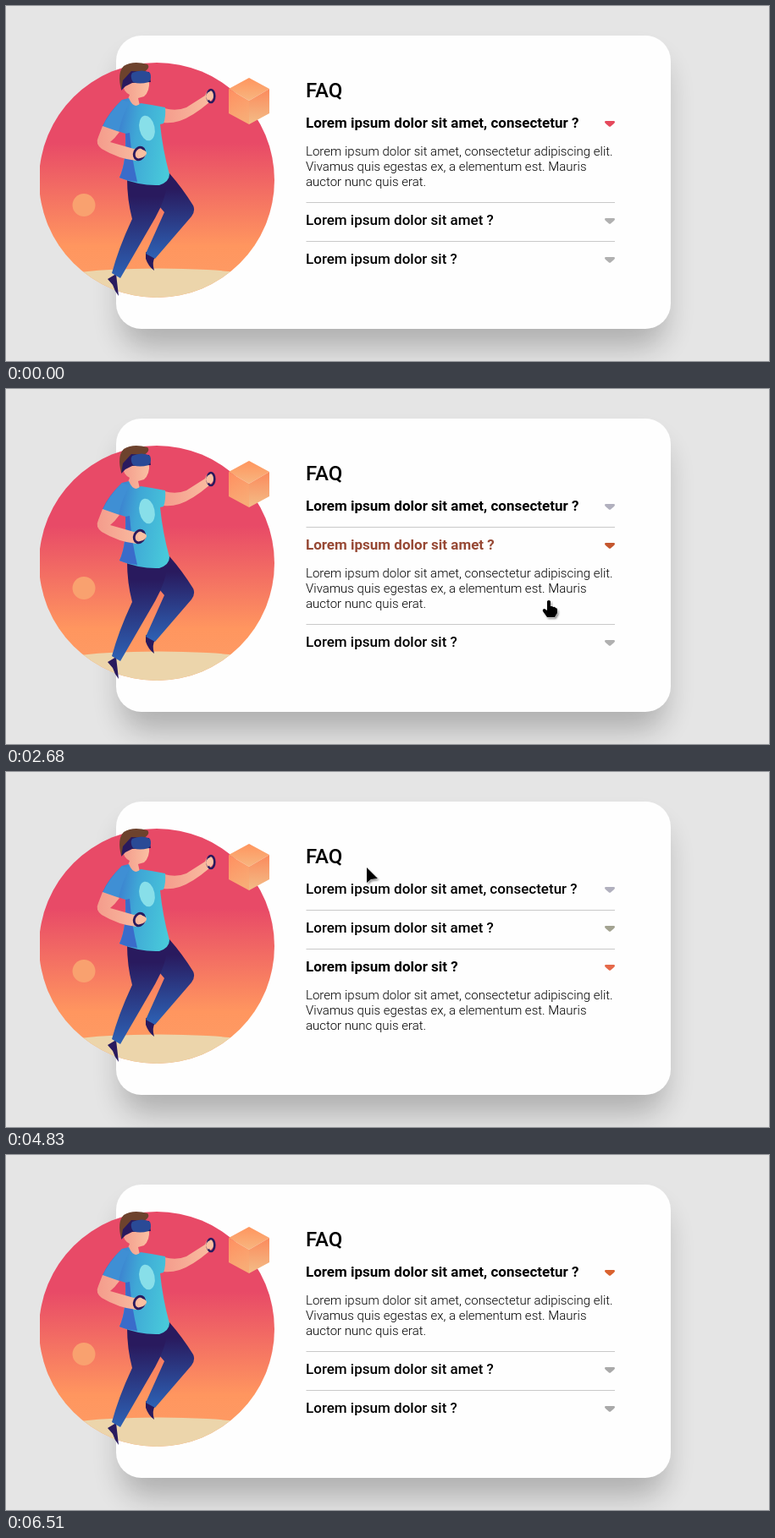
An HTML page for the animation above (6840 ms loop, 901 by 420 pixels).

```html
<!DOCTYPE html>
<html lang="en">
<head>
<meta charset="utf-8">
<title>FAQ</title>
<style>
html, body { margin: 0; width: 100%; height: 100%; overflow: hidden; background: #e5e5e5; }
svg { display: block; width: 901px; height: 420px; font-family: Roboto, sans-serif; }
.heading { font-size: 24px; font-weight: 500; }
.title { font-size: 17px; }
.body { font-size: 15px; font-weight: 300; }
</style>
</head>
<body>
<svg viewBox="0 0 901 420">
  <defs>
    <linearGradient id="sky" x1="0" y1="0" x2="0" y2="1">
      <stop offset=".34" stop-color="#e84a67"/><stop offset=".78" stop-color="#ff965f"/><stop offset="1" stop-color="#fd9d66"/>
    </linearGradient>
    <linearGradient id="shirt" x1="0" y1=".4" x2="1" y2=".6">
      <stop offset=".1" stop-color="#3b72cd"/><stop offset=".48" stop-color="#3fa7d6"/><stop offset="1" stop-color="#48c9da"/>
    </linearGradient>
    <linearGradient id="denim" x1="0" y1="0" x2="0" y2="1">
      <stop offset=".18" stop-color="#291a5e"/><stop offset="1" stop-color="#2d62b5"/>
    </linearGradient>
    <linearGradient id="skin" x1="0" y1="0" x2="1" y2="0">
      <stop offset="0" stop-color="#f49c8c"/><stop offset="1" stop-color="#fac0a2"/>
    </linearGradient>
    <linearGradient id="cubeTop" x1="0" y1="0" x2="0" y2="1">
      <stop offset="0" stop-color="#ff955e"/><stop offset="1" stop-color="#f7b680"/>
    </linearGradient>
    <linearGradient id="cubeLeft" x1="0" y1="0" x2=".3" y2="1">
      <stop offset="0" stop-color="#ff8f60"/><stop offset="1" stop-color="#f8ac76"/>
    </linearGradient>
    <linearGradient id="cubeRight" x1="0" y1="0" x2="0" y2="1">
      <stop offset="0" stop-color="#fb8a5c"/><stop offset="1" stop-color="#f3bd87"/>
    </linearGradient>
    <clipPath id="disc"><path d="M40 60H330V350H40Z"/></clipPath>
    <clipPath id="ground"><circle cx="178" cy="206" r="139"/></clipPath>
    <filter id="blur" x="-20%" y="-30%" width="140%" height="160%"><feGaussianBlur stdDeviation="17"/></filter>
    <filter id="soft" x="-50%" y="-50%" width="200%" height="200%"><feGaussianBlur stdDeviation="1.3"/></filter>
  </defs>

  <rect width="901" height="420" fill="#e5e5e5"/>
  <rect x="136" y="62" width="643" height="342" rx="30" opacity=".23" filter="url(#blur)"/>
  <rect x="130" y="35" width="655" height="347" rx="30" fill="#fefefe"/>

  <g clip-path="url(#disc)">
    <circle cx="178" cy="206" r="139" fill="url(#sky)"/>
    <ellipse cx="180" cy="331" rx="150" ry="20.500" fill="#ecd5ab" clip-path="url(#ground)"/>
  </g>
  <circle cx="92" cy="235.500" r="13.500" fill="#f9a16f"/>
  <path d="M287 85L311 98L287 112L263 98Z" fill="url(#cubeTop)"/>
  <path d="M263 98L287 112V140L263 127Z" fill="url(#cubeLeft)"/>
  <path d="M311 98L287 112V140L311 127Z" fill="url(#cubeRight)"/>

  <g id="person">
    <path d="M165 291L176 297Q172 303 175 313Q168 308 165 299Z" fill="#291a5e"/>
    <path d="M120 323L130 317L133 343Q128 337 126 330Z" fill="#291a5e"/>
    <path d="M160 204L193 198Q208 215 221 236Q224 242 219 249L176 299L165 293L187 244L170 224Z" fill="url(#denim)"/>
    <path d="M143 204L191 205Q190 226 176 251Q157 284 135 322L125 316Q133 286 149 252Q143 229 143 204Z" fill="url(#denim)"/>
    <path d="M187 121Q201 125 213 120L235 106Q238 98 243 100L247 107L240 114Q220 131 205 136Q195 139 186 138Z" fill="url(#skin)"/>
    <ellipse cx="242" cy="106.500" rx="4.300" ry="7.500" fill="none" stroke="#291a5e" stroke-width="2.600"/>
    <path d="M236 107Q238 100 243 102L244 108L238 112Z" fill="#fac0a2"/>
    <path d="M142 84L169 88Q170 101 163 107L156 109L158 118Q150 126 143 113L146 105Q138 101 138 91Z" fill="url(#skin)"/>
    <path d="M136 99Q131 79 139 71Q150 64 167 69Q172 74 158 81Q147 83 145 90L140 89Q140 97 136 99Z" fill="#6d422d"/>
    <path d="M138 88L148 77L169 78L171 90L149 91L141 95L136 100Z" fill="#291a5e"/>
    <path d="M149 79Q161 74 170 79Q173 86 168 90Q158 93 150 90Q146 84 149 79Z" fill="#2a4a96"/>
    <path d="M137 111L145 109Q151 123 159 115Q173 117 188 120Q189 131 186 139L182 140Q185 170 193 199Q193 208 181 212Q158 213 134 203Q142 186 141 151L114 142Q121 126 137 111Z" fill="url(#shirt)"/>
    <path d="M114 143Q121 127 137 111L146 114Q137 130 133 149Z" fill="#3f8fd4"/>
    <path d="M146 150Q148 178 155 208Q143 207 134 203Q143 183 141 151Z" fill="#3a6cca"/>
    <ellipse cx="166.500" cy="144.500" rx="9" ry="15" fill="#88dfe9" transform="rotate(-12 166.500 144.500)"/>
    <path d="M114 142L134 149Q129 156 123 161L151 169Q161 166 166 174Q164 182 154 183Q133 181 113 169Q105 163 109 155Z" fill="url(#skin)"/>
    <ellipse cx="157.500" cy="174.500" rx="6" ry="7.500" fill="none" stroke="#291a5e" stroke-width="2.800" transform="rotate(24 157.500 174.500)"/>
    <path d="M155 173Q161 167 166 173Q165 179 158 180Z" fill="#fac0a2"/>
  </g>

  <text class="heading" x="354" y="108">FAQ</text>
  <g id="list"></g>

  <g id="cursor">
    <g id="hand">
      <path id="palm" d="M-2 1Q0-1 2 1V7Q4 6 5 8Q7 7 8 9Q10 9 10 11V15L7 20H-2L-7 13Q-8 10-5 10L-2 12Z"/>
      <path d="M-2 1Q0-1 2 1V7Q4 6 5 8Q7 7 8 9Q10 9 10 11V15L7 20H-2L-7 13Q-8 10-5 10L-2 12Z" stroke="#fff" stroke-width="1" paint-order="stroke"/>
    </g>
    <g id="pointer">
      <path d="M0 0V18L5 14L13 13Z"/>
      <path d="M0 0V18L5 14L13 13Z" stroke="#fff" stroke-width="1" paint-order="stroke"/>
    </g>
  </g>
</svg>
<script>
const LOOP = 6840;
const SVG = 'http://www.w3.org/2000/svg';
const byId = id => document.getElementById(id);
const TITLES = ['Lorem ipsum dolor sit amet, consectetur ?', 'Lorem ipsum dolor sit amet ?', 'Lorem ipsum dolor sit ?'];
const BODY = ['Lorem ipsum dolor sit amet, consectetur adipiscing elit.',
  'Vivamus quis egestas ex, a elementum est. Mauris', 'auctor nunc quis erat.'];

// Bursts of screen updates: start, end, number of updates.
const BURSTS = [[720, 1350, 10], [1420, 1560, 3], [1760, 2400, 10], [2470, 3030, 9], [3180, 3850, 10],
  [3920, 4550, 10], [4620, 5250, 10], [5320, 5950, 10], [6020, 6510, 8]];

// Which entry is open from a given time, and the caret colours that go with it.
const STATES = [
  { at: 0, open: 0, carets: ['#e5495c', '#b0b0b0', '#b0b0b0'] },
  { at: 2540, open: 1, carets: ['#b1b0be', '#c4572f', '#b0b0b0'] },
  { at: 3990, open: 2, carets: ['#b1b0be', '#a3a391', '#e5694a'] },
  { at: 5460, open: 0, carets: ['#d9622f', '#a9a9a9', '#a9a9a9'] }
];

// Hover spans: entry, enter, leave.
const HOVERS = [[1, 2240, 2540], [2, 3466, 3990], [1, 4480, 4620], [0, 5010, 5470]];
const FADE = 400;
const HOVER_RGB = [232, 112, 82];

// Cursor hotspot: time, x, y.
const PATH = [[720, 773, 398], [930, 745, 290], [1210, 694, 156], [1350, 704, 152], [1560, 716, 138],
  [1760, 716, 138], [1830, 717, 129], [2050, 695, 190], [2330, 641, 250], [3180, 641, 250], [3330, 671, 246],
  [3626, 517, 303], [3850, 512, 305], [4060, 512, 305], [4340, 488, 240], [4550, 455, 173],
  [4830, 426, 113], [5040, 445, 137], [5460, 445, 137], [5810, 655, 180], [5950, 759, 269], [6440, 868, 401]];

function add(parent, tag, attrs, text = '') {
  const node = document.createElementNS(SVG, tag);
  for (const key in attrs) node.setAttribute(key, attrs[key]);
  node.textContent = text;
  return parent.appendChild(node);
}

const list = byId('list');
const body = add(list, 'g', { class: 'body' });
BODY.forEach((line, i) => add(body, 'text', { x: 354, y: 33 + i * 18 }, line));
const entries = TITLES.map((text, i) => {
  const group = add(list, 'g', {});
  return {
    group,
    title: add(group, 'text', { class: 'title', x: 354, y: 0 }, text),
    caret: add(group, 'path', { d: 'M708-8H718Q720-7 718-5L714-1.500Q713-.8 712-1.500L708-5Q706-7 708-8Z' }),
    line: i < 2 && add(group, 'path', { d: 'M354.500 0H719', stroke: '#c9c9c9' })
  };
});

for (const id of ['hand', 'pointer']) {
  const shadow = byId(id).firstElementChild;
  shadow.setAttribute('transform', 'translate(1.500 2)');
  shadow.setAttribute('opacity', '.45');
  shadow.setAttribute('filter', 'url(#soft)');
}

function snap(t) {
  const burst = BURSTS.findLast(b => b[0] <= t);
  if (!burst) return 0;
  const [start, end, count] = burst;
  const step = (end - start) / (count - 1);
  return Math.min(end, start + Math.floor((t - start) / step + 1e-6) * step);
}

function slope(i, axis) {
  const prev = PATH[i - 1], here = PATH[i], next = PATH[i + 1];
  if (!prev || !next) return 0;
  const rests = p => p[1] === here[1] && p[2] === here[2];
  return rests(prev) || rests(next) ? 0 : (next[axis] - prev[axis]) / (next[0] - prev[0]);
}

function cursorAt(t) {
  const i = Math.max(0, Math.min(PATH.length - 2, PATH.findLastIndex(p => p[0] <= t)));
  const a = PATH[i], b = PATH[i + 1], span = b[0] - a[0];
  const u = Math.min(1, (t - a[0]) / span), v = 1 - u;
  return [1, 2].map(k => v * v * (1 + 2 * u) * a[k] + u * u * (3 - 2 * u) * b[k]
    + span * u * v * (v * slope(i, k) - u * slope(i + 1, k)));
}

function hoverLevel(entry, t) {
  let level = 0;
  for (const [which, enter, leave] of HOVERS) {
    if (which !== entry || t < enter) continue;
    const peak = Math.min(1, (Math.min(t, leave) - enter) / FADE + (leave - enter > 250 ? .25 : 0));
    level = Math.max(level, peak - Math.max(0, t - leave) / FADE);
  }
  return level;
}

function render(time) {
  const t = snap(time);
  const now = STATES.findLastIndex(s => s.at <= t);
  const state = STATES[now], before = STATES[now - 1];
  let y = 144;
  entries.forEach((entry, i) => {
    const open = i === state.open;
    const closing = before && before.open === i && t - state.at < 210;
    const level = hoverLevel(i, t);
    entry.group.setAttribute('transform', `translate(0 ${y})`);
    entry.title.setAttribute('font-weight', open || closing ? 600 : 500);
    entry.title.setAttribute('fill', `rgb(${HOVER_RGB.map(c => Math.round(c * level))})`);
    entry.caret.setAttribute('fill', state.carets[i]);
    if (entry.line) entry.line.setAttribute('transform', `translate(0 ${open ? 88.5 : 19.5})`);
    if (open) body.setAttribute('transform', `translate(0 ${y})`);
    y += open ? 115 : 46;
  });

  const [x, cy] = cursorAt(Math.max(t, PATH[0][0]));
  const overList = x >= 354 && x <= 719 && cy >= 121 && cy <= 322;
  byId('cursor').setAttribute('transform', `translate(${x.toFixed(1)} ${cy.toFixed(1)})`);
  byId('cursor').setAttribute('visibility', t >= 720 && t < 6510 ? 'visible' : 'hidden');
  byId('hand').setAttribute('display', overList ? 'inline' : 'none');
  byId('pointer').setAttribute('display', overList ? 'none' : 'inline');
}

const begin = performance.now();
function tick() {
  render((performance.now() - begin) % LOOP);
  requestAnimationFrame(tick);
}
tick();
</script>
</body>
</html>
```
